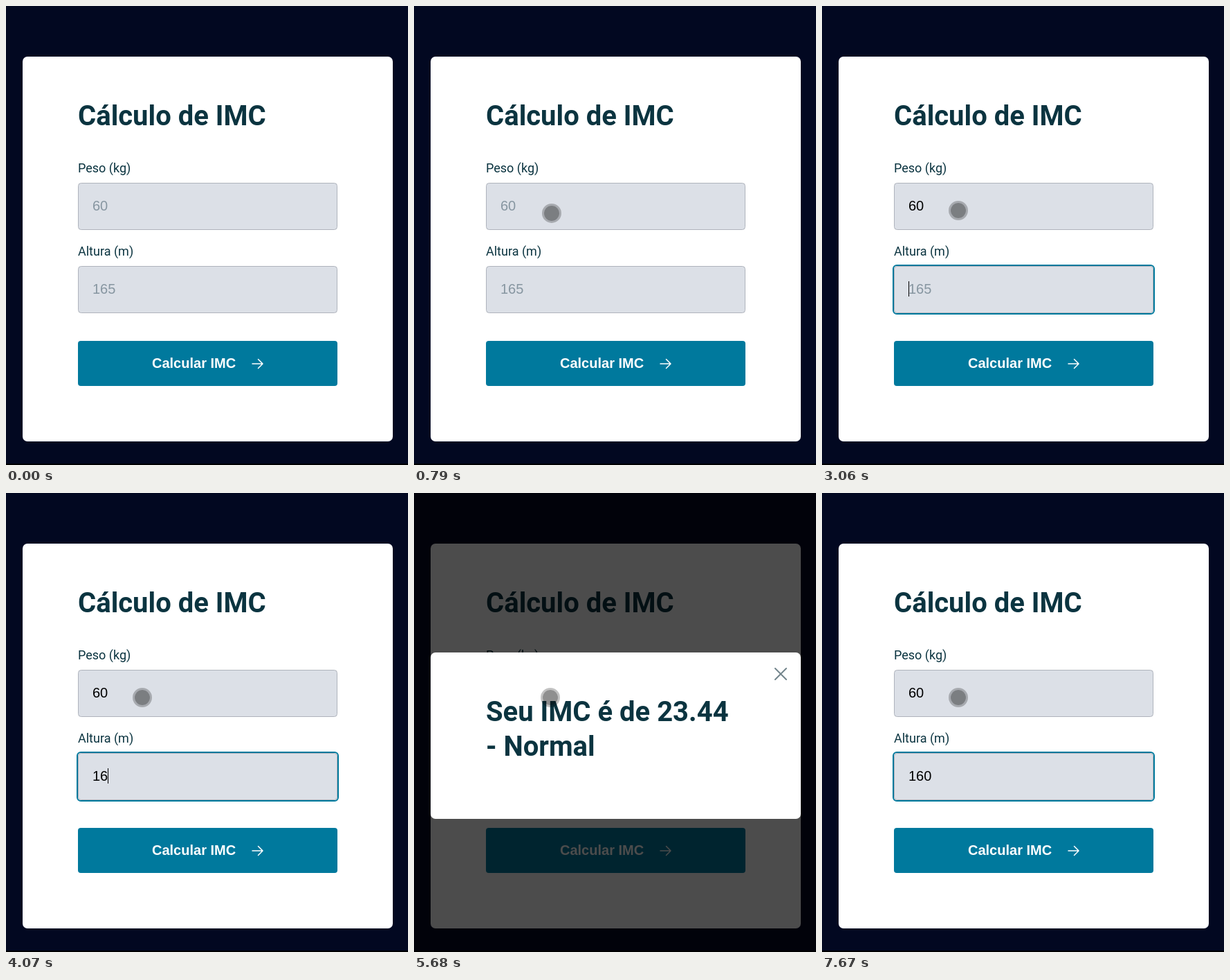
Write an HTML page that moves like this. It is 581 by 662 pixels and loops after 8 s.

```html
<!DOCTYPE html>
<html lang="pt-BR">
<head>
<meta charset="utf-8">
<title>Cálculo de IMC</title>
<style>
  html, body { margin: 0; width: 100%; height: 100%; overflow: hidden; background: #020821; }
  svg { display: block; }
  text { font: 20px "Liberation Sans", Arial, sans-serif; white-space: pre; }
  .title { font: 700 40px Roboto, sans-serif; fill: #0b3440; }
  .label { font: 18px Roboto, sans-serif; fill: #0b3440; }
  .box { fill: #dce0e7; stroke: #afb3bc; }
  .ring { fill: none; stroke: #00799d; stroke-width: 2; }
  .button { font-weight: 700; fill: #fff; }
  .icon { fill: none; stroke-linecap: round; stroke-linejoin: round; }
</style>
</head>
<body>
<svg width="581" height="662" viewBox="0 0 581 662">
  <rect width="581" height="662" fill="#020821"/>
  <rect y="660" width="581" height="2" fill="#000"/>
  <rect x="24" y="73" width="535" height="555" rx="7" fill="#fff"/>
  <text class="title" x="104" y="172">Cálculo de IMC</text>
  <text class="label" x="104" y="240">Peso (kg)</text>
  <text class="label" x="104" y="360">Altura (m)</text>
  <g id="fields"></g>
  <rect x="104" y="483" width="375" height="65" rx="4" fill="#00799d"/>
  <text class="button" x="211" y="522">Calcular IMC</text>
  <path class="icon" d="M356 516H371M364.5 509.5L371 516L364.5 522.5" stroke="#fff" stroke-width="1.5"/>
  <g id="modal">
    <rect width="581" height="662" opacity=".7"/>
    <rect x="24" y="230" width="535" height="240" rx="7" fill="#fff"/>
    <path class="icon" d="M522 253L538 269M538 253L522 269" stroke="#73858c" stroke-width="2"/>
    <text class="title" x="104" y="329">Seu IMC é de 23.44</text>
    <text class="title" x="104" y="379">- Normal</text>
  </g>
  <g id="pointer">
    <circle r="12.5" fill="none" stroke="#000" stroke-width="3" opacity=".24"/>
    <circle r="11" opacity=".44"/>
  </g>
</svg>
<script>
const LOOP = 8000, DIGIT = 11.12;
const $ = id => document.getElementById(id);

// Pointer path: [ms, x, y]
const path = [[320, 420, 626], [390, 375, 560], [450, 340, 505], [520, 311, 463],
  [590, 285, 423], [720, 225, 341], [790, 199, 299], [860, 197, 295]];

// Typed keys: [ms, text]; caret: [ms it turns on, ms it turns off]
const fields = [
  { y: 255, hint: "60", focus: [930, 3060], keys: [[2330, "6"], [2460, "60"]],
    caret: [[930, 1460], [2000, 2990]] },
  { y: 375, hint: "165", focus: [3060, LOOP], keys: [[3590, "1"], [4070, "16"], [5150, "160"]],
    caret: [[3060, 3540], [3590, 4600], [5080, 7670]] }
];

const within = (t, [from, to]) => t >= from && t < to;
const show = (el, on) => el.setAttribute("visibility", on ? "visible" : "hidden");

for (const f of fields) {
  const g = document.createElementNS("http://www.w3.org/2000/svg", "g");
  g.innerHTML = `<rect class="box" x="104.5" y="${f.y + 0.5}" width="374" height="67" rx="4"/>
    <rect class="ring" x="103" y="${f.y - 1}" width="377" height="70" rx="5"/>
    <text x="125" y="${f.y + 40}"></text>
    <rect y="${f.y + 22.5 | 0}" width="1" height="22"/>`;
  [, f.ring, f.text, f.bar] = g.children;
  $("fields").append(g);
}

function drawField(f, t) {
  const value = f.keys.reduce((v, [ms, s]) => t >= ms ? s : v, "");
  f.text.textContent = value || f.hint;
  f.text.setAttribute("fill", value ? "#000" : "#8796a1");
  f.bar.setAttribute("x", Math.floor(125 + value.length * DIGIT));
  show(f.ring, within(t, f.focus));
  show(f.bar, f.caret.some(span => within(t, span)));
}

function pointerAt(t) {
  const i = path.findIndex(p => p[0] > t);
  if (i < 0) return path.at(-1).slice(1);
  const [a, b] = [path[i - 1], path[i]];
  const k = (t - a[0]) / (b[0] - a[0]);
  return [a[1] + (b[1] - a[1]) * k, a[2] + (b[2] - a[2]) * k];
}

function draw(t) {
  fields.forEach(f => drawField(f, t));
  show($("modal"), within(t, [5680, 7610]));
  show($("pointer"), t >= path[0][0]);
  if (t >= path[0][0]) $("pointer").setAttribute("transform", `translate(${pointerAt(t)})`);
}

const start = performance.now();
function tick() {
  draw((performance.now() - start) % LOOP);
  requestAnimationFrame(tick);
}
tick();
</script>
</body>
</html>
```
